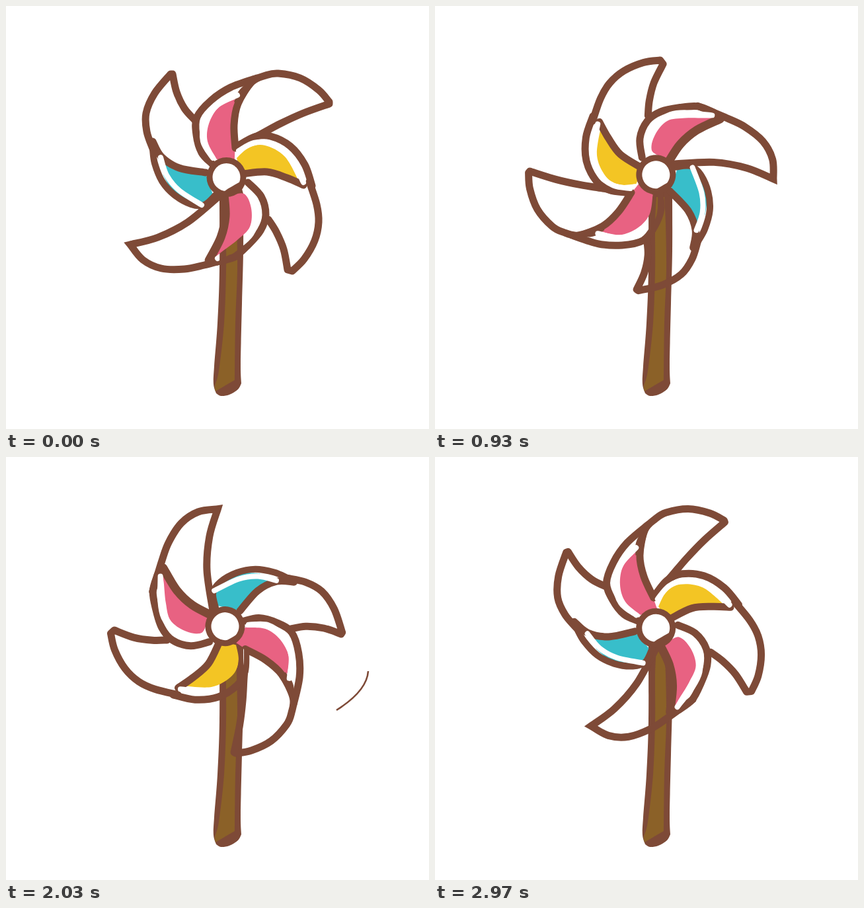
An HTML page that plays this animation: 640 px wide and 640 px high, repeating every 3010 ms.

```html
<!DOCTYPE html>
<html lang="en">
<head>
<meta charset="utf-8">
<title>Pinwheel</title>
<style>
  html, body { margin: 0; width: 100%; height: 100%; overflow: hidden; background: #fff; }
  svg { display: block; width: 100%; height: 100%; }
  .line { fill: none; stroke: #7e4a37; stroke-linecap: round; stroke-linejoin: round; }
</style>
</head>
<body>
<svg viewBox="0 0 640 640">
  <defs>
    <mask id="holes" maskUnits="userSpaceOnUse" x="0" y="0" width="640" height="640">
      <rect width="640" height="640" fill="#fff"/>
      <circle cx="333.5" cy="259" r="21" fill="#000"/>
      <g id="strips" fill="none" stroke="#000" stroke-width="8" stroke-linecap="round"/>
    </mask>
  </defs>
  <g id="stem"></g>
  <g id="wheel" mask="url(#holes)">
    <g id="fills"></g>
    <g id="edges" class="line" stroke-width="11"></g>
    <circle cx="333.5" cy="259" r="30" fill="#7e4a37"/>
  </g>
  <g id="wind" class="line" stroke-width="2.6" style="stroke-linecap:butt"></g>
</svg>
<script>
const BROWN = '#7e4a37', OLIVE = '#8b6128';
const PINK = '#e86282', YELLOW = '#f3c524', TEAL = '#38beca';
const LOOP = 3010, TICK = 100 / 3, TURN = 9.44, WIND_CYCLE = 37;
const PIVOT = '333.3 257';
const $ = id => document.getElementById(id);

function add(parent, attrs) {
  const el = document.createElementNS('http://www.w3.org/2000/svg', 'path');
  for (const key in attrs) el.setAttribute(key, attrs[key]);
  return $(parent).appendChild(el);
}

// Smooth curve through "x,y x,y ..." points; "|" marks a corner.
function curve(text) {
  let d = '';
  for (const part of text.split('|')) {
    const p = part.trim().split(/\s+/).map(s => s.split(',').map(Number));
    d += (d ? 'L' : 'M') + p[0];
    for (let i = 0; i < p.length - 1; i++) {
      const a = p[i - 1] || p[i], b = p[i], c = p[i + 1], e = p[i + 2] || c;
      d += 'C' + [b[0] + (c[0] - a[0]) / 6, b[1] + (c[1] - a[1]) / 6,
                  c[0] - (e[0] - b[0]) / 6, c[1] - (e[1] - b[1]) / 6, ...c];
    }
  }
  return d;
}
const fill = (parent, color, points) => add(parent, { fill: color, d: curve(points) + 'Z' });
const edge = (points, extra) => add('edges', { d: curve(points), ...extra });
const strip = points => add('strips', { d: curve(points) });

fill('stem', BROWN, '323,286 323,400 320,480 315,545 314,572 318,586 | 318,586 325,590 338,588 351,580 356,571 | 356,571 355,540 357,450 359,370 359,284 | 354,266 335,277');
fill('stem', OLIVE, '335,289 333,330 333,400 330,480 322,552 316,575 317,583 | 317,583 332,574 346,566 | 346,566 347,480 350,400 349,330 347,289');

fill('fills', PINK, '346,141 322,153 307,178 305,205 319,232 | 346,232 347,185 346,141');
fill('fills', YELLOW, '349,230 368,214 392,211 422,228 444,267 | 415,253 385,250 355,252');
fill('fills', PINK, '335,288 360,284 371,306 369,334 350,354 325,373 311,385 | 325,355 333,320');
fill('fills', TEAL, '236,232 262,246 302,253 | 314,288 298,298 | 284,300 262,290 248,274 238,256');

// upper left blade
edge('222,216 213,190 212,162 225,132 249,103 | 252,103 258,130 270,155 286,173');
edge('222,205 235,228 262,245 302,252');
// upper right blade
edge('347,215 345,180 351,148 372,115 393,105 412,102 445,109 473,127 489,145 | 489,148 450,162 415,178 385,194 352,211');
// lower right blade
edge('358,254 395,251 425,260 450,271');
edge('397,323 409,342 420,368 426,399 | 433,401 451,383 467,355 473,327 470,300 459,266');
// lower left blade
edge('346,380 300,392 270,398 235,397 207,384 188,361 | 188,361 230,350 275,327 322,288', { 'stroke-linejoin': 'miter' });
edge('330,285 332,318 325,350 307,385', { 'stroke-width': 13 });
// coloured blades
edge('312,239 296,222 288,195 289,168 310,143 340,123 380,109');
edge('352,211 376,198 400,197 430,212 452,240 463,272');
edge('366,267 386,288 393,316 385,340 366,362 345,380 320,387');
edge('222,217 225,238 236,265 255,286 280,300 300,301 317,286', { 'stroke-width': 10 });
// solid corners between neighbouring blades
fill('fills', BROWN, '385,104 355,125 345,145 | 353,150 375,118');
fill('fills', BROWN, '400,190 375,193 350,207 | 355,216 385,198');

strip('350,135 320,150 301,175 298,205 313,230');
strip('352,219 375,207 400,208 430,229 450,267');
strip('364,281 376,299 379,322 371,345 353,362 320,382');
strip('234,229 243,256 262,279 296,301');

// Each breeze line flashes twice per cycle, starting at the given steps.
const breeze = [
  ['M548 324Q546 354 500 383', 12, 29],
  ['M543 371Q530 402 483 417', 14, 31],
  ['M109 174Q88 212 101 248', 6, 24.7],
  ['M134 162Q112 198 121 230', 8, 26.7]
].map(([d, ...starts]) => ({ el: add('wind', { d }), starts }));

const flash = age => Math.max(0, Math.min(1, age / 2, (4.4 - age) / 2.4));

function draw(ms) {
  const tick = Math.min(89, Math.floor((ms % LOOP + 4) / TICK));
  const step = Math.ceil(tick * 5 / 6 - 0.5);
  $('wheel').setAttribute('transform', `rotate(${step * TURN} ${PIVOT})`);
  const phase = step % WIND_CYCLE;
  for (const { el, starts } of breeze)
    el.setAttribute('opacity', Math.max(...starts.map(s => flash(phase - s))));
}

const begin = performance.now();
function loop() {
  draw(performance.now() - begin);
  requestAnimationFrame(loop);
}
loop();
</script>
</body>
</html>
```
